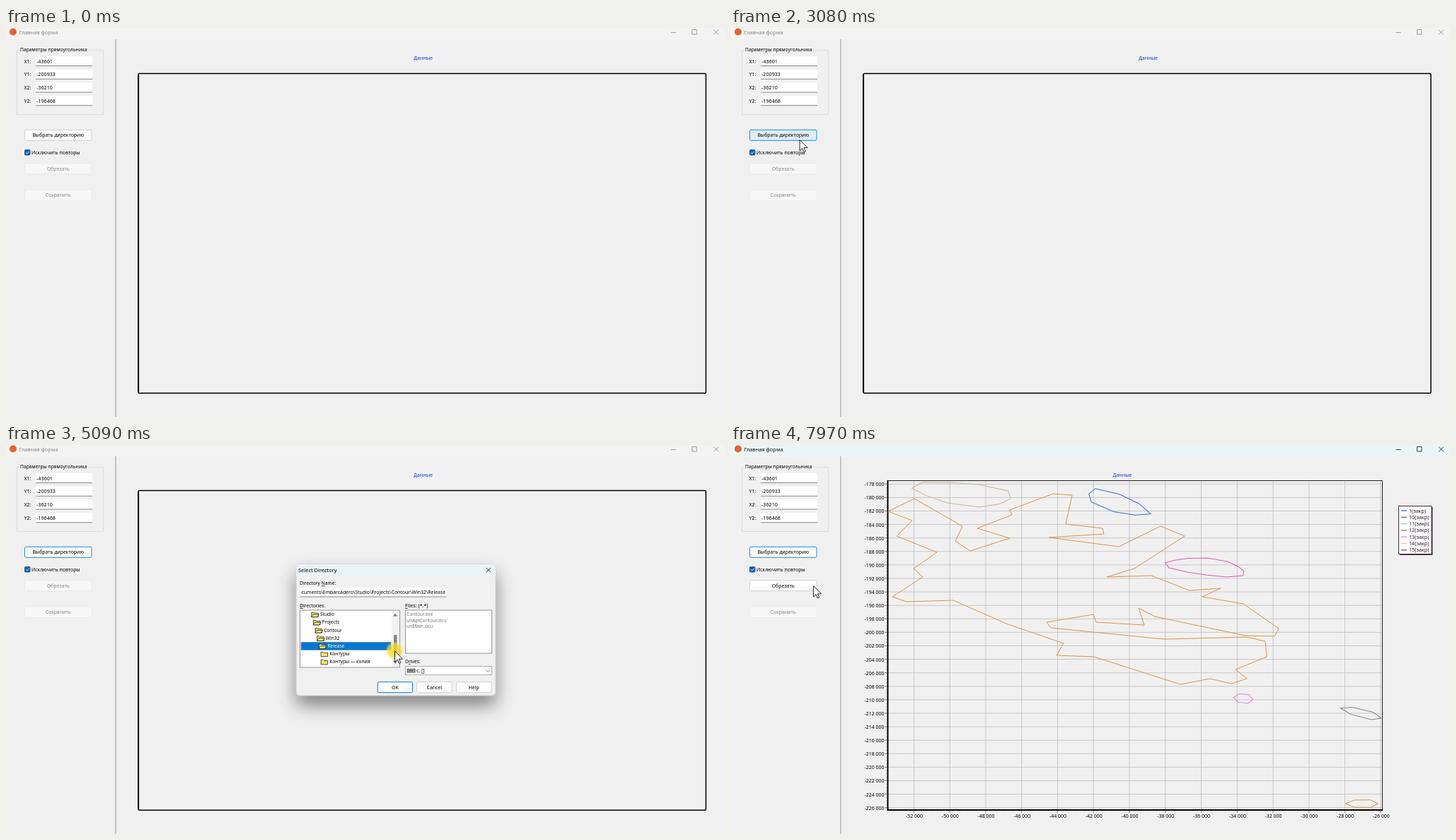
Animation, 1016 px wide and 551 px high, one loop 8000 ms. Source, as an HTML page:

```html
<!DOCTYPE html>
<html lang="ru">
<head>
<meta charset="utf-8">
<title>Главная форма</title>
<style>
html, body { margin: 0; width: 100%; height: 100%; overflow: hidden; background: #f0f0f0; }
svg { display: block; width: 1016px; height: 551px; font-family: "Noto Sans", "Open Sans", sans-serif; }
text { white-space: pre; }
.u { text-decoration: underline; }
</style>
</head>
<body>
<svg id="stage" viewBox="0 0 1016 551" xmlns="http://www.w3.org/2000/svg"></svg>
<script>
const LOOP = 8000, BLUE = '#0078d4', ORANGE = '#dc9346', PINK = '#e080d8';
const stage = document.getElementById('stage');

// Drawing helpers that return markup; text is placed by its vertical centre.
const text = (x, cy, s, { size = 6.85, fill = '#000', anchor = 'start', id = '' } = {}) =>
  `<text id="${id}" x="${x}" y="${cy + size * 0.36}" font-size="${size}" fill="${fill}" text-anchor="${anchor}">${s}</text>`;
const rect = (x, y, w, h, fill, stroke = 'none', extra = '') =>
  `<rect x="${x}" y="${y}" width="${w}" height="${h}" fill="${fill}" stroke="${stroke}" ${extra}/>`;
const path = (d, stroke, width = 1, extra = '') =>
  `<path d="${d}" fill="none" stroke="${stroke}" stroke-width="${width}" ${extra}/>`;
const group = (id, body) => `<g id="${id}">${body}</g>`;
const clipped = (id, x, y, w, h, body) =>
  `<clipPath id="${id}">${rect(x, y, w, h, '#000')}</clipPath><g clip-path="url(#${id})">${body}</g>`;
const times = (n, fn) => Array.from({ length: n }, (_, i) => fn(i)).join('');
const underlined = s => s.replace(/_(.)/, '<tspan class="u">$1</tspan>');
const caption = x => text(x, 42.3, 'Данные', { size: 7, fill: '#1040c8', anchor: 'middle' });

const button = (id, x, y, w, label, stroke = '#d0d0d0') =>
  group(id, rect(x, y, w, 15, '#fdfdfd', stroke, 'rx="2"') + text(x + w / 2, y + 7.5, label, { anchor: 'middle' }));

function field([label, value], i) {
  const cy = 47 + 18.7 * i;
  return text(25.5, cy, label, { size: 7 }) + rect(42, cy - 7, 80, 14, '#fff') +
    path(`M42 ${cy + 6.6}h80`, '#868686') + text(43, cy, value, { size: 7.2 });
}

function mainWindow() {
  const fields = [['X1:', '-43601'], ['Y1:', '-200933'], ['X2:', '-36210'], ['Y2:', '-196468']];
  return rect(0, 0, 1016, 551, '#f0f0f0') + rect(0, 0, 1016, 16, '#f3f3f3') +
    rect(0, 0, 1016, 16, '#e9f6f9', 'none', 'id="tint"') +
    '<circle cx="10" cy="5.5" r="5" fill="#e4622b"/>' +
    group('titleInk', text(18.5, 6, 'Главная форма', { size: 7.4, fill: 'currentColor' }) +
      path('M939.5 6.5h7M969.5 2.5h6.5v6.5h-6.5ZM1000 2.5l7 7m0-7l-7 7', 'currentColor', 0.8)) +
    path('M155 16V551', '#a6a6a6', 1.2) +
    path('M19 31.5H15.5V122.5H137.5V31.5H117', '#dcdcdc') +
    text(20, 31, 'Параметры прямоугольника', { size: 6.7 }) + fields.map(field).join('') +
    button('pick', 26.5, 144.3, 94.5, 'Выбрать директорию') +
    rect(26, 172, 8.5, 8.5, '#1a5fb0', 'none', 'rx="2"') + path('M28 176.3l1.7 1.7 3-3.2', '#fff', 0.9) +
    text(36, 176.3, 'Исключить повторы') +
    button('crop', 26.5, 191.7, 94.5, 'Обрезать') + button('save', 26.5, 229.2, 94.5, 'Сохранить');
}

const emptyView = () => caption(589.5) +
  rect(187, 64.6, 802, 452.6, 'none', '#000', 'rx="1.5" stroke-width="1.5"') + path('M187.2 66V516', '#000', 1.8);

// A slightly uneven closed ring of n straight sides around an ellipse.
function ring(color, cx, cy, rx, ry, tilt, n) {
  const points = times(n, i => {
    const a = 2 * Math.PI * i / n, r = 1 + 0.1 * Math.sin(3 * a + n);
    return `${rx * r * Math.cos(a)},${ry * r * Math.sin(a)} `;
  });
  return `<polygon points="${points}" transform="translate(${cx} ${cy}) rotate(${tilt})" fill="none" stroke="${color}"/>`;
}

// Key corners of the main outline.
const OUTLINE = 'M222 94L259 76 327 115 317 136 338 150 394 132 348 118 397 99 394 92 455 69 482 71 473 112 ' +
  '525 118 527 126 449 131 548 144 607 115 641 129 570 175 531 187 594 185 648 206 692 203 666 215 724 225 ' +
  '774 260 768 271 727 270 599 243 576 231 584 255 516 251 512 240 446 251 452 259 612 275 728 272 755 278 ' +
  '757 300 713 318 729 331 707 338 677 331 635 339 513 300 460 298 470 281 389 253 314 220 248 222 228 215 ' +
  '271 187 258 175 291 152 234 129 256 107Z';

function legend() {
  const items = { '1': '#2f6fce', '10': '#5f6f58', '11': '#8cc8dc', '12': '#c04c88', '13': PINK, '14': '#dccb90', '15': '#5656bc' };
  return rect(945, 88, 46.5, 68, '#4c3a44') + rect(943.5, 86.5, 46.5, 68, '#fff', '#3c2c34') +
    Object.entries(items).map(([n, color], i) => path(`M947 ${93 + 9.3 * i}h8`, color, 1.3) +
      text(958, 93 + 9.3 * i, `${n}(закр)`, { size: 7.2, fill: '#301028' })).join('');
}

function chart() {
  const gx = i => 258.5 + 50.75 * i, gy = i => 55.3 + 19.1 * i;
  const grid = times(14, i => `M${gx(i)} 51V516`) + times(25, i => `M222 ${gy(i)}H920`);
  const ticks = times(14, i => `M${gx(i)} 517v4`) + times(25, i => `M221 ${gy(i)}h-4`);
  const minor = times(55, i => `M${gx(i / 4 - 0.5)} 517v2`) + times(97, i => `M221 ${gy(i / 4)}h-2`);
  return caption(553) + path(grid, '#c3c3c3', 0.9) + path(ticks, '#666', 0.8) + path(minor, '#999', 0.6) +
    times(25, i => text(216.5, gy(i) + 0.4, `-${178 + 2 * i} 000`, { size: 7, anchor: 'end' })) +
    times(14, i => text(gx(i) + 0.5, 525.5, `-${52 - 2 * i} 000`, { size: 7, anchor: 'middle' })) +
    path('M221 50.5H920.5V517', '#222') + path('M221.5 50V517H921', '#000', 2) +
    path(OUTLINE, ORANGE) +
    ring('#cbb58d', 329, 69, 70, 16, 6, 10) + ring('#2f6fce', 545, 82, 46, 13, 18, 8) +
    ring('#d85bb5', 672, 173, 56, 12, 6, 12) + ring(PINK, 724, 359, 14, 7, 6, 6) +
    ring('#85857a', 891, 380, 30, 6, 14, 6) + ring(ORANGE, 892, 508, 23, 6, 0, 6) + legend();
}

// Directory tree: Documents is the first row visible when the dialog opens.
const TREE = ['c:\\', 'Users', 'Viktor', 'Documents', 'Embarcadero', 'Studio', 'Projects',
  'Contour', 'Win32', 'Release', 'Контуры', 'Контуры — копия'];
const PITCH = 11.22;

function folder(x, y, open) {
  const style = 'stroke="#222" stroke-width=".8"';
  const flap = open ? `<path d="M0 7.5L2.5 4H11L8.5 7.5Z" fill="#fff27a" ${style}/>` : '';
  return `<g transform="translate(${x} ${y - 3.6})"><path d="M.5 7.5V1h3l1 1H10V7.5Z" fill="#f6e36a" ${style}/>${flap}</g>`;
}

function treeRows(selected) {
  const last = TREE.indexOf(selected);
  return TREE.map((name, k) => {
    const level = Math.min(k - 3, 7), cy = 239.7 + (k - 3) * PITCH, x = 426 + 2.65 * level, on = k === last;
    return (on ? rect(417, cy - 5.4, 127, 11.2, BLUE, '#a87040', 'stroke-width=".5"') : '') +
      folder(x, cy, k <= last) + text(x + 12.6, cy, name, { size: 6.6, fill: on ? '#fff' : '#000' });
  }).join('');
}

const fileRows = (names, size) =>
  names.map((name, i) => text(566, 239.8 + 8.55 * i, name, { size, fill: '#747474' })).join('');
const PATH = 'Documents\\Embarcadero\\Studio\\Projects\\Contour\\Win32\\Release';

function dialog() {
  const files = group('filesA', fileRows(['Contour.exe', 'unApiContour.dcu', 'unMain.dcu'], 6.7)) +
    group('filesB', fileRows([1, 10, 11, 12, 13, 14, 15].map(n => `Горные отводы_1#${n}.ktr`), 7.2) +
      rect(679, 246, 1.5, 11, '#858585'));
  return rect(410, 169, 282, 186, '#f0f0f0', '#b4b8ba', 'rx="5" stroke-width=".7" filter="url(#shadow)"') +
    '<path d="M410 186V174q0-5 5-5H687q5 0 5 5V186Z" fill="#e9f3f6"/>' +
    text(413, 177.7, 'Select Directory', { size: 7.45 }) +
    path('M678.5 174l6.5 6.5m0-6.5l-6.5 6.5', '#222', 0.9) +
    text(415, 196, underlined('Directory _Name:'), { size: 6.7 }) +
    rect(415, 202, 207.5, 13, '#fff') + path('M415 215h207.5', '#868686') +
    clipped('nameClip', 417, 202, 205, 13, text(621, 208.5, PATH, { anchor: 'end', id: 'dirName' })) +
    text(415, 227.7, underlined('_Directories:'), { size: 6.7 }) +
    text(564, 227.7, underlined('_Files: (*.*)'), { size: 7.1 }) +
    rect(415.5, 234, 141, 81, '#fff', '#858a92', 'stroke-width=".9"') +
    clipped('treeClip', 416, 235, 130, 79, group('treeA', treeRows('Release')) + group('treeB', treeRows('Контуры'))) +
    group('wideBar', rect(545, 235, 11, 79, '#f3f3f3') + '<path d="M547 242.5l3-4 3 4ZM547 306l3 4 3-4Z" fill="#777"/>') +
    rect(549, 260, 2, 34, '#858585', 'none', 'id="thumb" rx="1"') +
    rect(564.5, 234, 122, 61, '#fff', '#858a92', 'stroke-width=".9"') + clipped('fileClip', 565, 235, 121, 59.5, files) +
    text(564, 307, underlined('D_rives:'), { size: 6.7 }) +
    rect(564.5, 313.5, 122, 12, '#fff', '#a8a8a8', 'stroke-width=".9"') +
    rect(567.5, 317.5, 10.5, 4.5, '#b8b8b8', '#222', 'stroke-width=".8"') +
    path('M569 319.7h7', '#222', 0.9) + text(580, 319.7, 'c: []', { size: 7 }) +
    path('M678 318.5l3 3 3-3', '#555', 0.8) +
    button('ok', 525.2, 335.7, 49.3, 'OK', BLUE) +
    button('cancel', 580.5, 335.7, 49.5, 'Cancel') + button('help', 636.5, 335.7, 49.5, 'Help');
}

stage.innerHTML = `<defs>
  <radialGradient id="glow"><stop offset=".7" stop-color="#f5dc20" stop-opacity=".78"/>
    <stop offset="1" stop-color="#f8ea70" stop-opacity=".3"/></radialGradient>
  <filter id="shadow" x="-20%" y="-20%" width="140%" height="160%">
    <feDropShadow dx="0" dy="14" stdDeviation="13" flood-opacity=".45"/></filter>
  </defs>` + mainWindow() + group('empty', emptyView()) + group('chart', chart()) + group('dialog', dialog()) +
  group('cursor', '<circle id="click" r="12" fill="url(#glow)"/>' +
    '<path d="M.5.5V16l3.6-3.4 2.4 5.4 2.2-1-2.4-5.2H11.5Z" fill="#fff" stroke="#111" stroke-width=".9"/>');

const el = {};
stage.querySelectorAll('[id]').forEach(node => { if (node.id) el[node.id] = node; });

const within = (t, a, b) => t >= a && t < b;
const ramp = (t, a, b) => Math.min(1, Math.max(0, (t - a) / (b - a)));
const smooth = p => p * p * (3 - 2 * p);
const show = (node, on) => node.setAttribute('display', on ? 'inline' : 'none');
const set = (node, attrs) => Object.entries(attrs).forEach(([k, v]) => node.setAttribute(k, v));
const paint = (btn, fill, stroke, ink = '#000') => {
  set(btn.firstChild, { fill, stroke });
  set(btn.lastChild, { fill: ink });
};
const enable = (btn, on) => on ? paint(btn, '#fdfdfd', '#d0d0d0') : paint(btn, '#f7f7f7', '#ebebeb', '#888');

// The pointer rests between moves.
const MOVES = [
  { from: 330, to: 670, x: 851, y: 459 },
  { from: 1050, to: 1130, x: 843, y: 428 },
  { from: 1760, to: 2150, x: 209, y: 243 },
  { from: 2150, to: 2540, x: 95, y: 157 },
  { from: 3060, to: 3350, x: 204, y: 217 },
  { from: 3350, to: 4020, x: 549, y: 278 },
  { from: 4600, to: 5400, x: 549, y: 298 },
  { from: 5400, to: 5860, x: 494, y: 295 },
  { from: 6360, to: 6780, x: 549, y: 346 },
  { from: 7600, to: 7970, x: 116, y: 199 }
];
const CLICKS = [[2600, 2740], [4620, 5420], [5880, 6080], [6860, 6940]];

function pointer(t) {
  let x = 970, y = 546;
  for (const m of MOVES) {
    const p = smooth(ramp(t, m.from, m.to));
    x += (m.x - x) * p;
    y += (m.y - y) * p;
  }
  return [x, y];
}

const OPENED = 3110, REBUILT = 6090, LOADED = 6360, CLOSED = 6950;

// Rows scrolled: dragged in whole rows, then a glide after the list is rebuilt.
const treeScroll = t => t < REBUILT ? Math.floor(2 * ramp(t, 4600, 4960)) : -2.5 + 3.5 * ramp(t, REBUILT, 6290);

function drawDialog(t) {
  const opening = 1 - (1 - ramp(t, OPENED, 3330)) ** 3, closing = ramp(t, CLOSED, 7160);
  const scale = 0.92 + 0.08 * opening - 0.055 * closing;
  show(el.dialog, within(t, OPENED, 7160));
  set(el.dialog, {
    opacity: opening * (1 - closing ** 1.3),
    transform: `translate(550 262) scale(${scale}) translate(-550 -262)`
  });

  const rebuilt = t >= REBUILT, loaded = t >= LOADED, wide = within(t, 3950, 5700), scroll = treeScroll(t);
  show(el.treeA, !rebuilt);
  show(el.treeB, rebuilt);
  for (const tree of [el.treeA, el.treeB]) set(tree, { transform: `translate(0 ${-scroll * PITCH})` });
  show(el.wideBar, wide);
  set(el.thumb, { x: wide ? 548 : 549.2, width: wide ? 4.5 : 1.6, y: rebuilt ? 266 : 260 + 4.5 * scroll });
  show(el.filesA, !loaded);
  show(el.filesB, loaded);
  el.dirName.textContent = loaded ? PATH + '\\Контуры' : PATH;
  paint(el.ok, t >= 6720 ? '#e0eef9' : '#fdfdfd', BLUE);
}

function draw(t) {
  const [x, y] = pointer(t), done = t >= CLOSED;
  show(el.cursor, t >= 340);
  set(el.cursor, { transform: `translate(${x} ${y})` });
  show(el.click, CLICKS.some(([a, b]) => within(t, a, b)));

  show(el.empty, !done);
  show(el.chart, done);
  set(el.titleInk, { color: done ? '#111' : '#858585' });
  set(el.tint, { opacity: ramp(t, 7200, 7430) });

  const fill = within(t, 2610, 2740) ? '#cce4f7' : within(t, 2400, 3100) ? '#e0eef9' : '#fdfdfd';
  paint(el.pick, fill, t < 2400 ? '#d0d0d0' : '#2088d4');
  enable(el.crop, t >= 7230);
  enable(el.save, false);
  drawDialog(t);
}

const start = performance.now();
function tick() {
  draw((performance.now() - start) % LOOP);
  requestAnimationFrame(tick);
}
tick();
</script>
</body>
</html>
```
